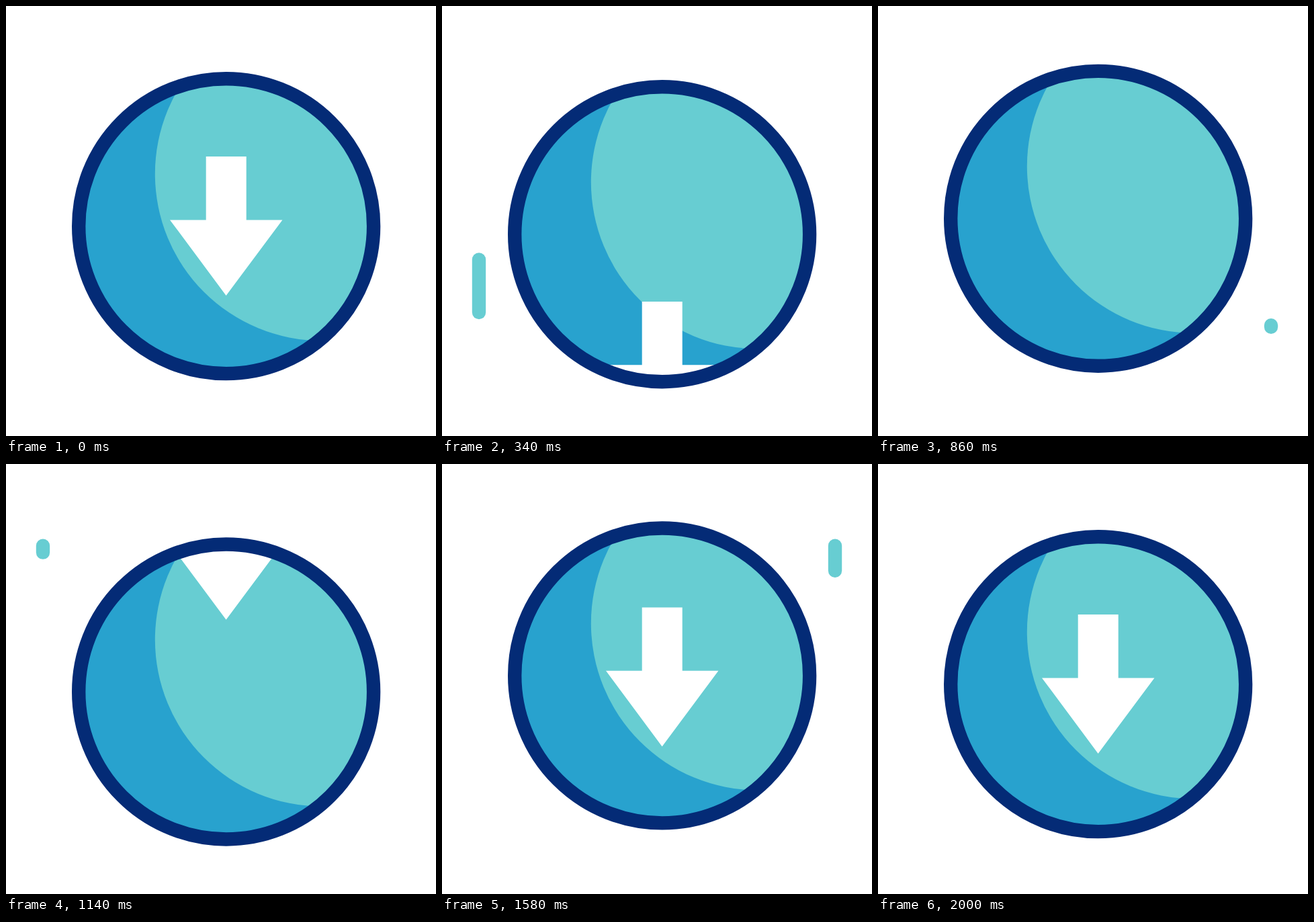
Write an HTML page that moves like this. It is 640 by 640 pixels and loops after 2120 ms.

```html
<!DOCTYPE html>
<html lang="en">
<head>
<meta charset="utf-8">
<title>Download</title>
<style>
  html, body { margin: 0; width: 100%; height: 100%; overflow: hidden; background: #fff; }
  svg { display: block; width: 100%; height: 100%; }
  .bar { stroke: #67cdd2; stroke-width: 20.4; stroke-linecap: round; }
</style>
</head>
<body>
<svg viewBox="0 0 640 640">
  <defs>
    <clipPath id="disc"><circle cx="327.65" cy="327.65" r="216"/></clipPath>
  </defs>
  <line class="bar" id="left" x1="55" x2="55"/>
  <line class="bar" id="right" x1="585" x2="585"/>
  <g id="ball">
    <g clip-path="url(#disc)">
      <circle cx="327.65" cy="327.65" r="216" fill="#28a2ce"/>
      <circle cx="470" cy="250" r="248.2" fill="#67cdd2"/>
      <path id="arrow" fill="#fff" d="M297.7 224H357.7V318.4H411.4L327.6 431L244 318.4H297.7Z"/>
    </g>
    <circle cx="327.65" cy="327.65" r="219.45" fill="none" stroke="#042b76" stroke-width="20.4"/>
  </g>
</svg>
<script>
  const LOOP = 2120, STEP = 20;
  const TOP = 121.7, BOTTOM = 477.7;
  const TRAIL = 80, SWEEP = 400;

  // Tables of [time, value]; equal times make a hard jump.
  const bounce = [[0, 0], [400, 12.9], [800, -12.9], [1200, 12.9], [1600, -12.9], [2000, 0]];
  const slide = [[0, 0], [600, 340], [800, 340], [800, -346], [1600, 2.8], [2000, 0]];
  const sweeps = { left: [0, 1100], right: [400, 1500] };

  const el = id => document.getElementById(id);
  const ease = x => {
    const s = Math.min(1, Math.max(0, x));
    return s * s * (3 - 2 * s);
  };

  function valueAt(keys, t) {
    const i = keys.findIndex(k => k[0] > t);
    if (i < 0) return keys[keys.length - 1][1];
    const [t0, a] = keys[i - 1], [t1, b] = keys[i];
    return a + (b - a) * ease((t - t0) / (t1 - t0));
  }

  const shift = (id, y) => el(id).setAttribute("transform", `translate(0 ${y})`);

  function drawBar(id, t) {
    const bar = el(id);
    const begin = sweeps[id].find(s => t > s && t < s + SWEEP + TRAIL);
    bar.style.display = begin === undefined ? "none" : "";
    if (begin === undefined) return;
    const along = time => TOP + (BOTTOM - TOP) * ease(time / SWEEP);
    bar.setAttribute("y1", along(t - begin - TRAIL));
    bar.setAttribute("y2", along(t - begin));
  }

  function draw(time) {
    const t = Math.floor((time % LOOP) / STEP) * STEP;
    shift("ball", valueAt(bounce, t));
    shift("arrow", valueAt(slide, t));
    drawBar("left", t);
    drawBar("right", t);
  }

  const start = performance.now();
  function tick() {
    draw(performance.now() - start);
    requestAnimationFrame(tick);
  }
  tick();
</script>
</body>
</html>
```
